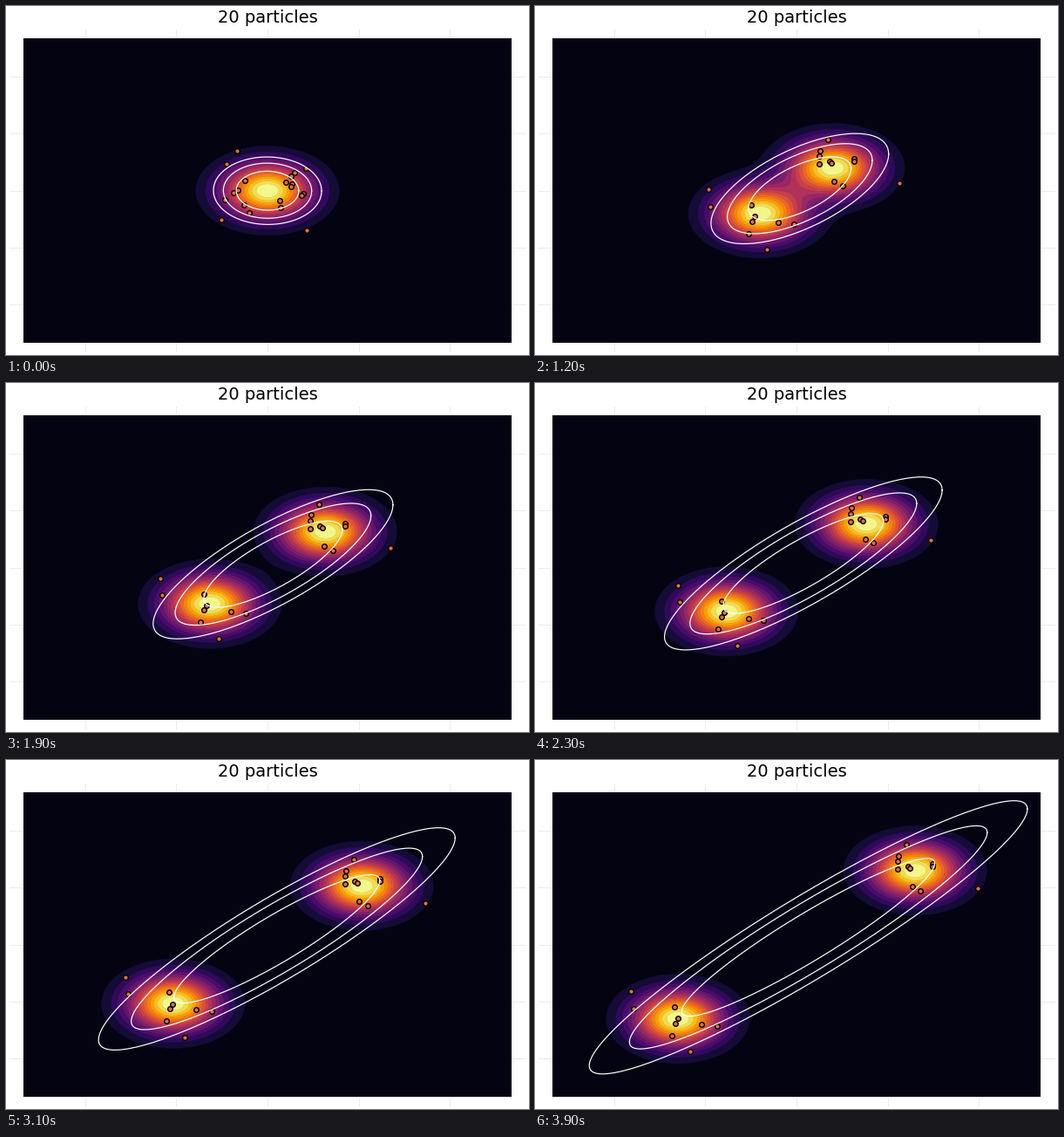
These frames come from a looping animation (600 px wide and 400 px high, 4000 ms). A matplotlib script:

```python
import numpy as np
import matplotlib.pyplot as plt
from matplotlib.animation import FuncAnimation
from matplotlib.patches import Rectangle

W, H, DPI = 600, 400, 100
PX = 72 / DPI                       # points per pixel
FRAMES, INTERVAL = 40, 100
CENTER = np.array([300.0, 211.7])
UNIT = np.array([34.9, -21.76])     # pixels per data unit
BANDS = 16
TURN = 6                            # frames to swing onto the diagonal

# Place of each particle along the axis joining the two components;
# the sign says which component it belongs to.
along = np.array([-1.57, -2.15, 2.27, 1.68, 1.44, -1.13, 1.15, 1.49, 1.48, -1.5,
                  -1.73, 2.16, 2.05, -2.26, 0.83, -1.16, 0.89, -0.87, -2.44, 2.32])
side = np.sign(along)
spread = along - 1.5 * side
drift = np.where(side > 0, 0.165, 0.23)

# Across that axis they follow evenly spaced logistic quantiles,
# centred within each component.
rank = (np.arange(len(along)) + 0.5) / len(along)
across = np.log((1 - rank) / rank)
for s in (-1, 1):
    across[side == s] -= across[side == s].mean()
across /= across.std()

fig = plt.figure(figsize=(W / DPI, H / DPI), dpi=DPI, facecolor="white")
ax = fig.add_axes([0, 0, 1, 1])
ax.set(xlim=(0, W), ylim=(H, 0))
ax.axis("off")

cmap = plt.get_cmap("inferno")
colors = [cmap((k + 0.5) / BANDS) for k in range(BANDS)]

for tick in (-6, -3, 0, 3, 6):
    gx, gy = CENTER + tick * UNIT
    style = dict(color="#ebebeb", lw=PX, zorder=0)
    ax.plot([gx, gx], [27, 396], **style)
    ax.plot([4, 596], [gy, gy], **style)
ax.add_patch(Rectangle((20, 37), 560, 349, fc=colors[0], lw=0, zorder=1))
ax.text(W / 2, 19, f"{len(along)} particles", fontsize=14, ha="center",
        va="baseline", family="DejaVu Sans")

dots, = ax.plot([], [], "o", ms=5.6 * PX, mfc="#e36f47", mec="black",
                mew=1.4 * PX, zorder=3)
rings = [ax.plot([], [], color="white", lw=1.2 * PX, zorder=4)[0]
         for _ in range(3)]

axis = np.linspace(-8, 8, 201)
gu, gv = np.meshgrid(axis, axis)
theta = np.linspace(0, 2 * np.pi, 181)
circle = np.array([np.cos(theta), np.sin(theta)])
fills = []


def density(m):
    def bump(c):
        return np.exp(-((gu - c) ** 2 + (gv - c) ** 2) / 2)
    return bump(m) + bump(-m)


def lag(i):
    """Outward drift of the particles, fading to 0 at the end."""
    end = np.exp(-(FRAMES - 9) / 17)
    return (np.exp(-(i - 8) / 17) - end) / (1 - end)


def particles(i):
    """Whitened and level at first, then split along the diagonal."""
    t = min(i / TURN, 1)
    t = t * t * (3 - 2 * t)
    level = (along - along.mean()) / along.std()
    split = spread + side * np.sqrt(2) * (i / 10 + drift * lag(i))
    a = (1 - t) * level + t * split
    c, s = np.cos(t * np.pi / 4), np.sin(t * np.pi / 4)
    uv = np.column_stack([c * a - s * across, s * a + c * across])
    return CENTER + uv * UNIT


def update(i):
    while fills:
        fills.pop().remove()
    z = density(i / 10)
    levels = np.linspace(0, z.max(), BANDS + 1)[1:]
    levels[-1] *= 1.01
    cs = ax.contourf(CENTER[0] + gu * UNIT[0], CENTER[1] + gv * UNIT[1], z,
                     levels=levels, colors=colors[1:], antialiased=True,
                     zorder=2)
    cs.set(edgecolor="face", linewidth=0.3)
    fills.append(cs)
    ax.set(xlim=(0, W), ylim=(H, 0))

    pts = particles(i)
    dots.set_data(pts[:, 0], pts[:, 1])
    mean = pts.mean(axis=0)
    root = np.linalg.cholesky(np.cov(pts.T))
    for k, ring in enumerate(rings, 1):
        x, y = mean[:, None] + np.sqrt(k) * root @ circle
        ring.set_data(x, y)
    return [dots, *rings]


anim = FuncAnimation(fig, update, frames=FRAMES, interval=INTERVAL,
                     init_func=lambda: [], repeat=True, repeat_delay=0,
                     blit=False)
plt.show()
```
